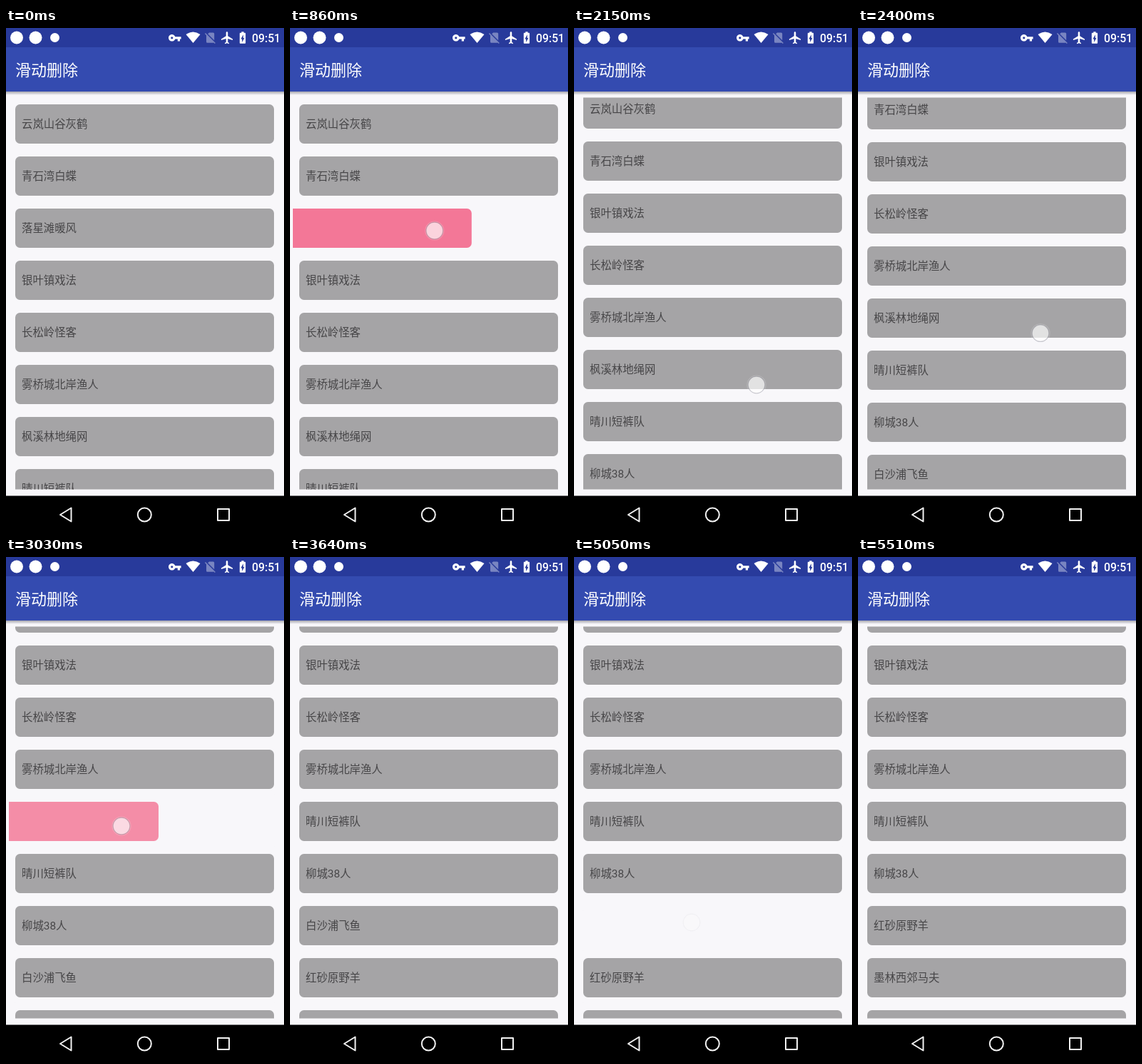
An HTML page for the animation above (5.58 s loop, 390 by 702 pixels).

```html
<!DOCTYPE html>
<html lang="zh-CN">
<head>
<meta charset="utf-8">
<style>
html, body { margin: 0; width: 100%; height: 100%; overflow: hidden; background: #f8f7fa; }
svg { display: block; }
text { font-family: Roboto, 'Noto Sans CJK SC', 'Noto Sans CJK', sans-serif; }
#list text { font-size: 15.4px; fill: #474648; }
</style>
</head>
<body>
<svg width="390" height="702" viewBox="0 0 390 702">
  <defs>
    <clipPath id="view"><rect x="4" y="97.5" width="382" height="549"/></clipPath>
    <linearGradient id="shade" x2="0" y2="1">
      <stop stop-color="#223" stop-opacity=".38"/>
      <stop offset="1" stop-color="#223" stop-opacity="0"/>
    </linearGradient>
  </defs>
  <rect width="390" height="702" fill="#f8f7fa"/>
  <g clip-path="url(#view)"><g id="list"></g></g>

  <rect y="89" width="390" height="5" fill="url(#shade)"/>
  <rect width="390" height="89" fill="#344bb0"/>
  <rect width="390" height="27" fill="#283a9b"/>
  <text x="13" y="66.5" font-size="22" fill="#fff">滑动删除</text>

  <g fill="#fff">
    <circle cx="15" cy="13.5" r="9"/>
    <circle cx="41.5" cy="13.5" r="9"/>
    <circle cx="68.5" cy="13.5" r="6.5"/>
    <path transform="translate(227.2 4.2) scale(.8)" d="M12.65 10C11.83 7.67 9.61 6 7 6c-3.31 0-6 2.69-6 6s2.69 6 6 6c2.61 0 4.83-1.67 5.65-4H17v4h4v-4h2v-4H12.65zM7 14c-1.1 0-2-.9-2-2s.9-2 2-2 2 .9 2 2-.9 2-2 2z"/>
    <path d="M262.5 21L252.500 9Q262.500 2 272.500 9Z"/>
    <path opacity=".38" transform="translate(277 4) scale(.8)" d="M18.99 5c0-1.1-.89-2-1.99-2h-7L7.66 5.34 19 16.68 18.99 5zM3.65 3.88L2.38 5.15 5 7.77V19c0 1.1.9 2 2 2h10.01c.35 0 .67-.1.96-.26l1.88 1.88 1.27-1.27L3.65 3.88z"/>
    <path transform="translate(300.2 3.5) scale(.85)" d="M21 16v-2l-8-5V3.5c0-.83-.67-1.5-1.5-1.5S10 2.67 10 3.5V9l-8 5v2l8-2.5V19l-2 1.5V22l3.5-1 3.5 1v-1.5L13 19v-5.5l8 2.5z"/>
    <path transform="translate(322 3.5) scale(.83)" d="M15.67 4H14V2h-4v2H8.33C7.6 4 7 4.6 7 5.33v15.33C7 21.4 7.6 22 8.33 22h7.33c.74 0 1.34-.6 1.34-1.33V5.33C17 4.6 16.4 4 15.67 4zM11 20v-5.5H9L13 7v5.500h2L11 20z"/>
    <text x="345" y="19.5" font-size="15.8" font-weight="500">09:51</text>
  </g>

  <rect y="655.5" width="390" height="46.5"/>
  <g fill="none" stroke="#f2f2f2" stroke-width="2" stroke-linejoin="round">
    <path d="M76 682L91.500 672.500V691.500Z"/>
    <circle cx="194.300" cy="682" r="9.500"/>
    <rect x="297" y="674" width="16" height="16"/>
  </g>

  <g id="touch">
    <circle r="13.5" fill="#fff" fill-opacity=".2"/>
    <circle r="11.8" fill="#fff" fill-opacity=".6" stroke="#556" stroke-opacity=".3" stroke-width="1.2"/>
  </g>
</svg>
<script>
const LOOP = 5580, PITCH = 73, WIDTH = 363;
const names = ['云岚山谷灰鹤', '青石湾白蝶', '落星滩暖风', '银叶镇戏法', '长松岭怪客',
  '雾桥城北岸渔人', '枫溪林地绳网', '晴川短裤队', '柳城38人', '白沙浦飞鱼',
  '红砂原野羊', '墨林西郊马夫', '海棠谷信使'];

// drag and close: [start, end, steps]; slide: when the rows below begin to move
const swipes = [
  { row: 2, x: 324, y: 284, drag: [550, 1100, 8], close: [1170, 1640, 7], slide: 1348 },
  { row: 6, x: 324, y: 377, drag: [2780, 3180, 6], close: [3410, 3640, 4], slide: 3370 },
  { row: 9, x: 327, y: 512, drag: [4570, 5050, 7], close: [5290, 5510, 4], slide: 5250 }
];
const scrolling = [2150, 2630, 7];

const list = document.getElementById('list');
const touch = document.getElementById('touch');
const add = (parent, tag, attrs) => {
  const el = parent.appendChild(document.createElementNS('http://www.w3.org/2000/svg', tag));
  for (const key in attrs) el.setAttribute(key, attrs[key]);
  return el;
};
const rows = names.map(name => {
  const g = add(list, 'g');
  const card = add(g, 'rect', { width: WIDTH, height: 55, rx: 6.5 });
  add(g, 'text', { x: 9, y: 33 }).textContent = name;
  return { g, card };
});

const clamp = (v, lo, hi) => Math.min(hi, Math.max(lo, v));
const ease = p => (1 - Math.cos(Math.PI * p)) / 2;
const stepAt = (t, [start, end, n]) =>
  clamp(Math.floor((t - start) / (end - start) * (n - 1) + 0.1), -1, n - 1);

function dragOffset(step, n) {
  if (step >= n - 1) return -WIDTH - 13;
  if (step === n - 2) return -292;
  return -162 * Math.pow(Math.max(step, 0) / (n - 3), 1.3);
}

function slideProgress(t, { close, slide }) {
  const step = stepAt(t, close);
  if (step < 0) return 0;
  const [start, end, n] = close;
  return clamp((start + step * (end - start) / (n - 1) - slide) / 250, 0, 1);
}

function draw(t) {
  const shift = rows.map(() => 0), dx = rows.map(() => 0), alpha = rows.map(() => 1);
  let finger = null;

  for (const s of swipes) {
    const n = s.drag[2], step = stepAt(t, s.drag);
    dx[s.row] = dragOffset(step, n);
    if (step >= 0 && t < s.close[0]) {
      const x = s.x + Math.max(dx[s.row], -162);
      finger = [x, s.y, step === n - 1 ? 0.15 : 1];
    }
    const p = slideProgress(t, s);
    for (let i = s.row + 1; i < rows.length; i++) {
      shift[i] += PITCH * ease(p);
      alpha[i] *= 1 - p * (1 - p); // old and new views cross-fade
    }
  }

  const step = stepAt(t, scrolling), last = scrolling[2] - 1;
  const scroll = step < 0 ? 0 : 21 + 108 * (1 - Math.pow(1 - step / last, 1.6));
  if (step >= 0 && step < last) finger = [256, 521 - scroll, 1];

  rows.forEach(({ g, card }, i) => {
    const y = Math.round(107 + PITCH * i - shift[i] - scroll);
    g.setAttribute('transform', `translate(${13 + dx[i]} ${y})`);
    g.setAttribute('opacity', Math.max(0, alpha[i] * (1 + dx[i] / WIDTH)));
    card.setAttribute('fill', dx[i] ? '#f23866' : '#a5a4a6');
  });

  touch.setAttribute('opacity', finger ? finger[2] : 0);
  if (finger) touch.setAttribute('transform', `translate(${finger[0]} ${finger[1]})`);
}

const begin = performance.now();
function frame() {
  draw((performance.now() - begin) % LOOP);
  requestAnimationFrame(frame);
}
frame();
</script>
</body>
</html>
```
